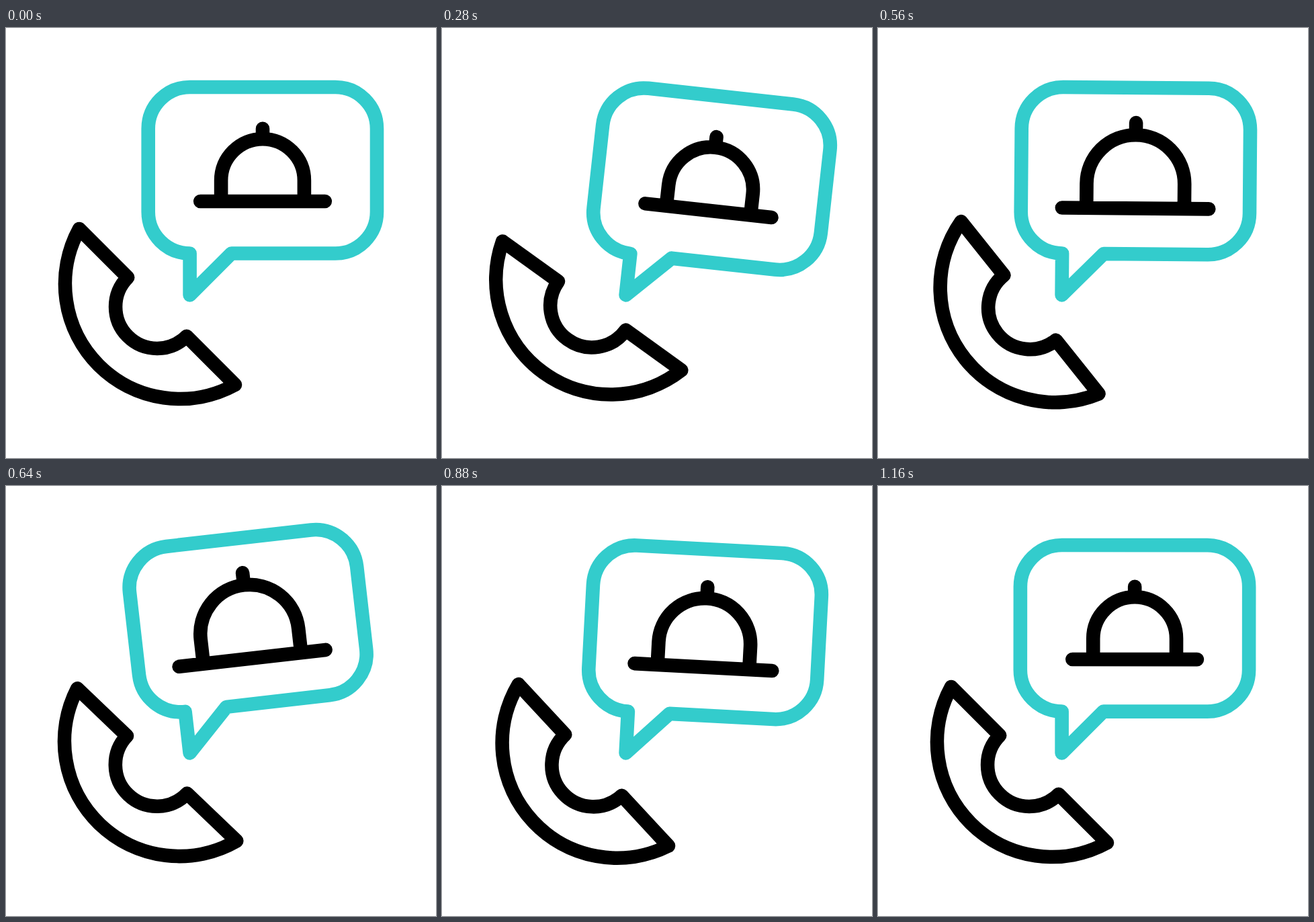
Write an HTML page that moves like this. It is 640 px wide and 640 px high and loops after 1440 ms.

```html
<!DOCTYPE html>
<html lang="en">
<head>
<meta charset="utf-8">
<title>Order by phone</title>
<style>
  html, body { margin: 0; width: 100%; height: 100%; overflow: hidden; background: #fff; }
  svg { display: block; width: 100%; height: 100%; }
</style>
</head>
<body>
<svg viewBox="0 0 640 640" fill="none" stroke="#000" stroke-width="20.6" stroke-linecap="round" stroke-linejoin="round">
  <path id="phone" d="M109 299 L181.2 371.2 A61.9 61.9 0 0 0 268.8 458.8 L341 531 A170.9 170.9 0 0 1 109 299 Z"/>
  <g id="bubble">
    <path stroke="#3cc" d="M273.6 335.5 V397.4 L335.5 335.5 H490.1 A61.9 61.9 0 0 0 552 273.6 V149.9 A61.9 61.9 0 0 0 490.1 88 H273.6 A61.9 61.9 0 0 0 211.7 149.9 V273.6 A61.9 61.9 0 0 0 273.6 335.5 Z"/>
    <path id="dish" d="M320.1 258 V227.1 A61.9 61.9 0 0 1 443.9 227.1 V258 M382 149.8 V165.2 M289.2 258 H474.8"/>
  </g>
</svg>
<script>
  const LOOP = 1440, STEP = 40, STROKE = 20.6;
  const [phone, bubble, dish] = ['phone', 'bubble', 'dish'].map(id => document.getElementById(id));

  const clamp = p => Math.min(1, Math.max(0, p));
  const ease = p => p * p * (3 - 2 * p);

  // Swings from rest through each peak and back to rest, one beat per move.
  function swing(t, start, beat, ...peaks) {
    const beats = (t - start) / beat, i = Math.floor(beats);
    const from = peaks[i - 1] || 0, to = peaks[i] || 0;
    return from + (to - from) * ease(beats - i);
  }

  // Rises to 1, holds and falls again, symmetric about the middle.
  const swell = (t, middle, reach, ramp) => ease(clamp((reach - Math.abs(t - middle)) / ramp));

  function draw(t) {
    const phoneAngle = swing(t, 113, 202, -10, 8, -6, 3.1);
    const bubbleAngle = swing(t, 156, 255, 13.1, -7.1, 3.8);
    const scale = 1 + 0.182 * swell(t, 650, 450, 400);
    phone.setAttribute('transform', `rotate(${phoneAngle} 214.5 425.5)`);
    bubble.setAttribute('transform', `rotate(${bubbleAngle} 273.6 397.4)`);
    dish.setAttribute('transform', `translate(382 204) scale(${scale}) translate(-382 -204)`);
    dish.setAttribute('stroke-width', STROKE / scale); // line weight stays constant
  }

  const start = performance.now();
  function tick(now) {
    const t = Math.max(0, now - start) % LOOP;
    draw(Math.floor(t / STEP) * STEP);
    requestAnimationFrame(tick);
  }
  draw(0);
  requestAnimationFrame(tick);
</script>
</body>
</html>
```
